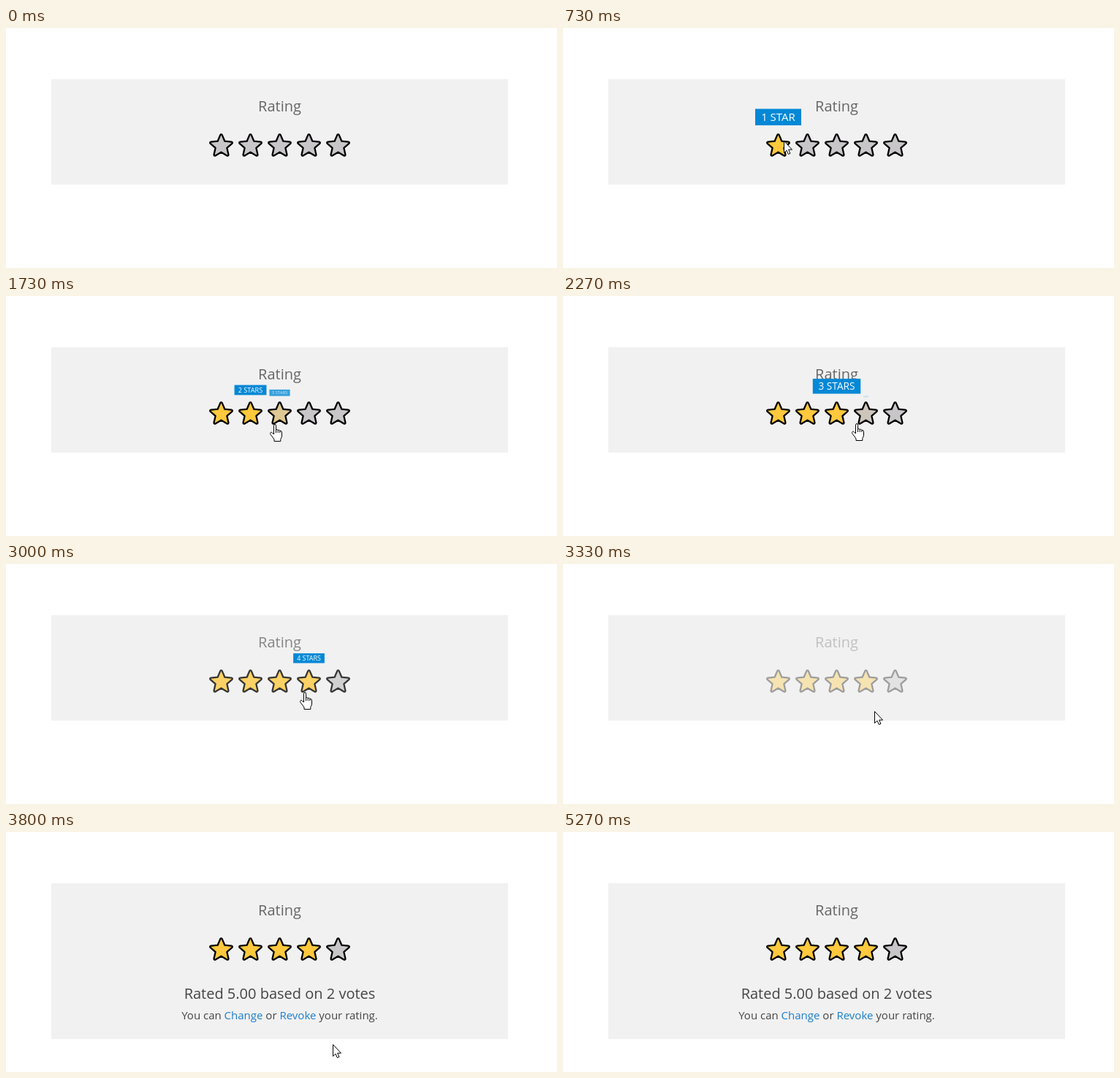
Write an HTML page with a canvas that moves like this. It is 754 by 328 pixels and loops after 6470 ms.

```html
<!DOCTYPE html>
<html lang="en">
<head>
<meta charset="utf-8">
<title>Rating</title>
<style>
  html, body { margin: 0; width: 100%; height: 100%; overflow: hidden; background: #fff; }
  canvas { display: block; }
</style>
</head>
<body>
<canvas id="stage" width="754" height="328"></canvas>
<script>
const ctx = document.getElementById('stage').getContext('2d');

const LOOP = 6470;
const STEP = 1000 / 15;
const CENTER = 374.5;
const PANEL = '#f1f1f1';
const FONT = '"Open Sans", sans-serif';
const TIP_TIME = 150;
const TIP_ORIGIN_Y = 139;

// Times at which the pointer enters stars 1 to 4, then leaves the last one.
const HOVERS = [560, 1210, 1695, 2258, 2960];

const POINTER = [
  [133, 456, 300], [330, 375, 223], [560, 314, 166], [733, 302, 154],
  [1066, 302, 154], [1330, 328, 168], [1600, 338, 173], [1733, 367, 175],
  [1866, 372, 175], [2066, 372, 175], [2267, 401, 174], [2400, 408, 175],
  [3000, 408, 175], [3333, 426, 201], [3600, 438, 241], [3800, 447, 290]
];
const OPACITY = [[2933, 1], [3133, 0.35], [3467, 0.35], [3800, 1]];

const ARROW = new Path2D('M.5 .5V16.5L4 13.2L6.4 18.5L8.9 17.4L6.6 12.2H11.5Z');
const HAND = new Path2D('M5.5 14V2.2Q5.5 .5 7 .5T8.5 2.2V8Q9.5 6.7 11.2 8.4' +
  'Q12.5 7.4 13.8 9.2Q16.5 8.7 16.5 12V16Q16.5 18 14.8 20.5V23.5H6V21' +
  'Q4.5 18.5 1.2 14.5C-.5 12 1.5 10.3 3.5 12Z');
const KNUCKLES = new Path2D('M8.5 8V12M11.2 8.4V12M13.8 9.2V12');
const STAR = starPath(18, 8.3, 1.3);

function starPath(outer, inner, rounding) {
  const path = new Path2D();
  const point = i => {
    const angle = (i * 36 - 90) * Math.PI / 180;
    const radius = i % 2 ? inner : outer;
    return [radius * Math.cos(angle), radius * Math.sin(angle)];
  };
  path.moveTo(...point(-1));
  for (let i = 0; i < 10; i += 2) {
    path.arcTo(...point(i), ...point(i + 1), rounding);
    path.lineTo(...point(i + 1));
  }
  path.closePath();
  return path;
}

function track(keys, t) {
  if (t <= keys[0][0]) return keys[0].slice(1);
  for (let i = 1; i < keys.length; i++) {
    const [a, b] = [keys[i - 1], keys[i]];
    if (t < b[0]) {
      const u = (t - a[0]) / (b[0] - a[0]);
      return a.slice(1).map((v, k) => v + (b[k + 1] - v) * u);
    }
  }
  return keys[keys.length - 1].slice(1);
}

function ease(t, start) {
  const u = Math.min(1, Math.max(0, (t - start) / TIP_TIME));
  return Math.sin(u * Math.PI / 2);
}

function text(str, x, y, size, color, align = 'center') {
  ctx.font = `${size}px ${FONT}`;
  ctx.textAlign = align;
  ctx.fillStyle = color;
  ctx.fillText(str, x, y);
}

const starX = i => 294.5 + 40 * i;

function drawStar(i, t) {
  const lit = i < 4 ? ease(t, HOVERS[i]) : 0;
  const mix = (from, to) => Math.round(from + (to - from) * lit);
  ctx.save();
  ctx.translate(starX(i), 161.4);
  ctx.fillStyle = `rgb(${mix(200, 255)},${mix(198, 200)},${mix(200, 61)})`;
  ctx.fill(STAR);
  ctx.strokeStyle = '#000';
  ctx.lineWidth = 2.3;
  ctx.lineJoin = 'round';
  ctx.stroke(STAR);
  ctx.restore();
}

function drawTip(i, t) {
  const scale = ease(t, HOVERS[i]) - ease(t, HOVERS[i + 1]);
  if (scale < 0.01) return;
  const width = i ? 72 : 63;
  ctx.save();
  ctx.translate(starX(i), TIP_ORIGIN_Y);
  ctx.scale(scale, scale);
  ctx.globalAlpha = Math.min(1, scale * 2);
  ctx.fillStyle = '#0288d6';
  ctx.fillRect(-width / 2, -28.5, width, 22.5);
  text(i ? `${i + 1} STARS` : '1 STAR', 0, -12, 15, '#fff');
  ctx.restore();
}

function drawSummary() {
  text('Rated 5.00 based on 2 votes', CENTER, 228, 20, '#444');
  const parts = ['You can ', 'Change', ' or ', 'Revoke', ' your rating.'];
  ctx.font = `15px ${FONT}`;
  const widths = parts.map(p => ctx.measureText(p).width);
  let x = CENTER - widths.reduce((a, b) => a + b) / 2;
  parts.forEach((part, i) => {
    text(part, x, 256, 15, i % 2 ? '#1b7fcc' : '#444', 'left');
    x += widths[i];
  });
}

function drawPointer(t) {
  if (t < 130 || t > 5260) return;
  const [x, y] = track(POINTER, t);
  const hand = t > 1100 && t < 3050;
  const shape = hand ? HAND : ARROW;
  ctx.save();
  ctx.translate(Math.round(x) - (hand ? 6 : 0), Math.round(y));
  ctx.fillStyle = '#fff';
  ctx.strokeStyle = '#000';
  ctx.lineWidth = 1;
  ctx.fill(shape);
  ctx.stroke(shape);
  if (hand) ctx.stroke(KNUCKLES);
  ctx.restore();
}

function draw(t) {
  const rated = t > 3460;
  const height = rated ? 213 : 144;
  ctx.fillStyle = '#fff';
  ctx.fillRect(0, 0, 754, 328);
  ctx.fillStyle = PANEL;
  ctx.fillRect(62, 70, 625, height);

  text('Rating', CENTER, 114, 20, '#666');
  for (let i = 0; i < 5; i++) drawStar(i, t);
  if (rated) drawSummary();

  // Fade the contents towards the panel colour.
  const [opacity] = track(OPACITY, t);
  if (opacity < 1) {
    ctx.globalAlpha = 1 - opacity;
    ctx.fillStyle = PANEL;
    ctx.fillRect(62, 70, 625, height);
    ctx.globalAlpha = 1;
  }

  for (let i = 0; i < 4; i++) drawTip(i, t);
  drawPointer(t);
}

function tick() {
  const t = performance.now() % LOOP;
  draw(Math.floor((t + 3.4) / STEP) * STEP);
  requestAnimationFrame(tick);
}
tick();
</script>
</body>
</html>
```
